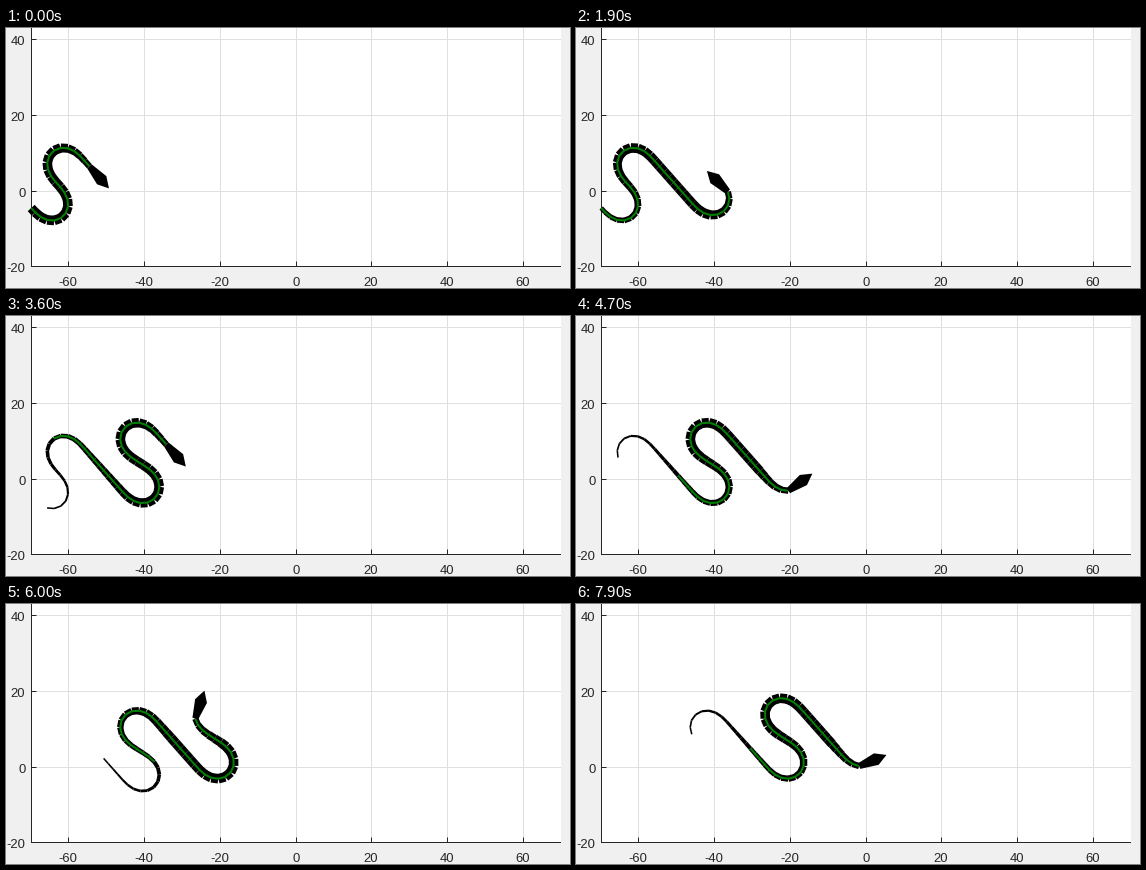
A matplotlib script that plays this animation: 564x260 px, repeating every 8 s.

```python
import numpy as np
import matplotlib.pyplot as plt
from matplotlib.animation import FuncAnimation
from matplotlib.collections import LineCollection
from matplotlib.patches import Polygon, Rectangle

W, H, DPI = 564, 260, 100
PX = 72 / DPI                       # one pixel in points
FRAMES, INTERVAL = 80, 100
PAUSES = {3, 6, 9, 13, 42, 52}      # ticks on which the snake rests

DARK, GRID = "#262626", "#dfdfdf"
LEFT, RIGHT, BOTTOM = 25.5, 555, 238.5
SCALE = 530 / 140                   # pixels per data unit

# The snake lays one link per move; the body is the most recent links.
LINK, LINKS = 7.15, 51
LENGTH = LINK * LINKS
START_ARC = 156

# Trail pieces as (length, turn in degrees): an opening S, then a repeated wave.
START, START_HEADING = (25.2, 180), 48.5
OPENING = [(74, -181), (74, 181)]
WAVE = [(55.4, 0), (82, -196.5), (6, 0), (82, 196.5)]


def build_trail(pieces, n=400):
    """Integrate a heading that eases through each turn."""
    u = (np.arange(n) + 0.5) / n
    ease = u * u * (3 - 2 * u)
    heading, headings, steps = START_HEADING, [], []
    for length, turn in pieces:
        headings.append(np.radians(heading + turn * ease))
        steps.append(np.full(n, length / n))
        heading += turn
    angle, ds = np.concatenate(headings), np.concatenate(steps)
    x = START[0] + np.r_[0, np.cumsum(ds * np.cos(angle))]
    y = START[1] + np.r_[0, np.cumsum(ds * np.sin(angle))]
    return np.r_[0, np.cumsum(ds)], x, y


arc, trail_x, trail_y = build_trail(OPENING + WAVE * 3)


def at(s):
    return np.column_stack([np.interp(s, arc, trail_x), np.interp(s, arc, trail_y)])


def body_width(d):
    """Width in pixels at distance d behind the neck."""
    taper = 1.5 + 8.1 * np.clip((LENGTH - d) / 215, 0, 1) ** 1.3
    return np.minimum(taper, 6 + 0.09 * d)


fig = plt.figure(figsize=(W / DPI, H / DPI), dpi=DPI, facecolor="#f0f0f0")
ax = fig.add_axes([0, 0, 1, 1])
ax.set_xlim(0, W)
ax.set_ylim(H, 0)
ax.axis("off")


def line(x0, y0, x1, y1, color):
    ax.plot([x0, x1], [y0, y1], color=color, lw=PX, solid_capstyle="butt",
            snap=False, zorder=2)


def draw_axes():
    font = dict(family="Liberation Sans", size=13 * PX, color=DARK, va="baseline")
    xs = [(v, np.floor(290 + SCALE * v) + 0.5) for v in range(-60, 61, 20)]
    ys = [(v, np.floor(163 - SCALE * v) + 0.5) for v in range(0, 41, 20)]
    ax.add_patch(Rectangle((25, -2), RIGHT - 25, 241, fc="white", ec="none", zorder=0))
    for _, x in xs:
        line(x, 0, x, BOTTOM, GRID)
    for _, y in ys:
        line(LEFT, y, RIGHT, y, GRID)
    line(LEFT, 0, LEFT, BOTTOM + 0.5, DARK)
    line(LEFT - 0.5, BOTTOM, RIGHT, BOTTOM, DARK)
    for v, x in xs:
        line(x, BOTTOM, x, BOTTOM - 5, DARK)
        ax.text(x - 0.5, 258, str(v), ha="center", **font)
    for v, y in ys + [(-20, BOTTOM)]:
        line(LEFT, y, LEFT + 5, y, DARK)
        ax.text(19.3, y + 5.8, str(v), ha="right", **font)


draw_axes()
body = LineCollection([], colors="black", capstyle="butt", zorder=4)
ax.add_collection(body, autolim=False)
stripe, = ax.plot([], [], color=(0, 0.5, 0), lw=2 * PX, solid_capstyle="butt", zorder=5)
head = Polygon([(0, 0)] * 5, closed=True, fc="black", ec="none", zorder=6)
ax.add_patch(head)


def update(i):
    moves = sum(k not in PAUSES for k in range(1, i + 1))
    neck = START_ARC + LINK * moves

    joints = neck - LINK * np.arange(LINKS + 1)
    joints = np.r_[joints[joints > 0], max(0, joints[-1])]
    behind = neck - joints
    pts = at(joints)
    body.set_segments(np.stack([pts[:-1], pts[1:]], axis=1))
    body.set_linewidths(body_width((behind[:-1] + behind[1:]) / 2) * PX)

    lit = (behind < LENGTH / 2) | (body_width(behind) > 4.2)
    stripe.set_data(pts[lit, 0], pts[lit, 1])

    # The head looks slightly ahead along the trail.
    a, b = at(np.array([neck + 8, neck + 11]))
    d = (b - a) / np.hypot(*(b - a))
    n = np.array([-d[1], d[0]])
    outline = [(0, 3), (18.5, 6.2), (29.5, 0), (18.5, -6.2), (0, -3)]
    head.set_xy([pts[0] + u * d + v * n for u, v in outline])
    return body, stripe, head


anim = FuncAnimation(fig, update, frames=FRAMES, interval=INTERVAL,
                     repeat=True, repeat_delay=0, blit=False)
plt.show()
```
